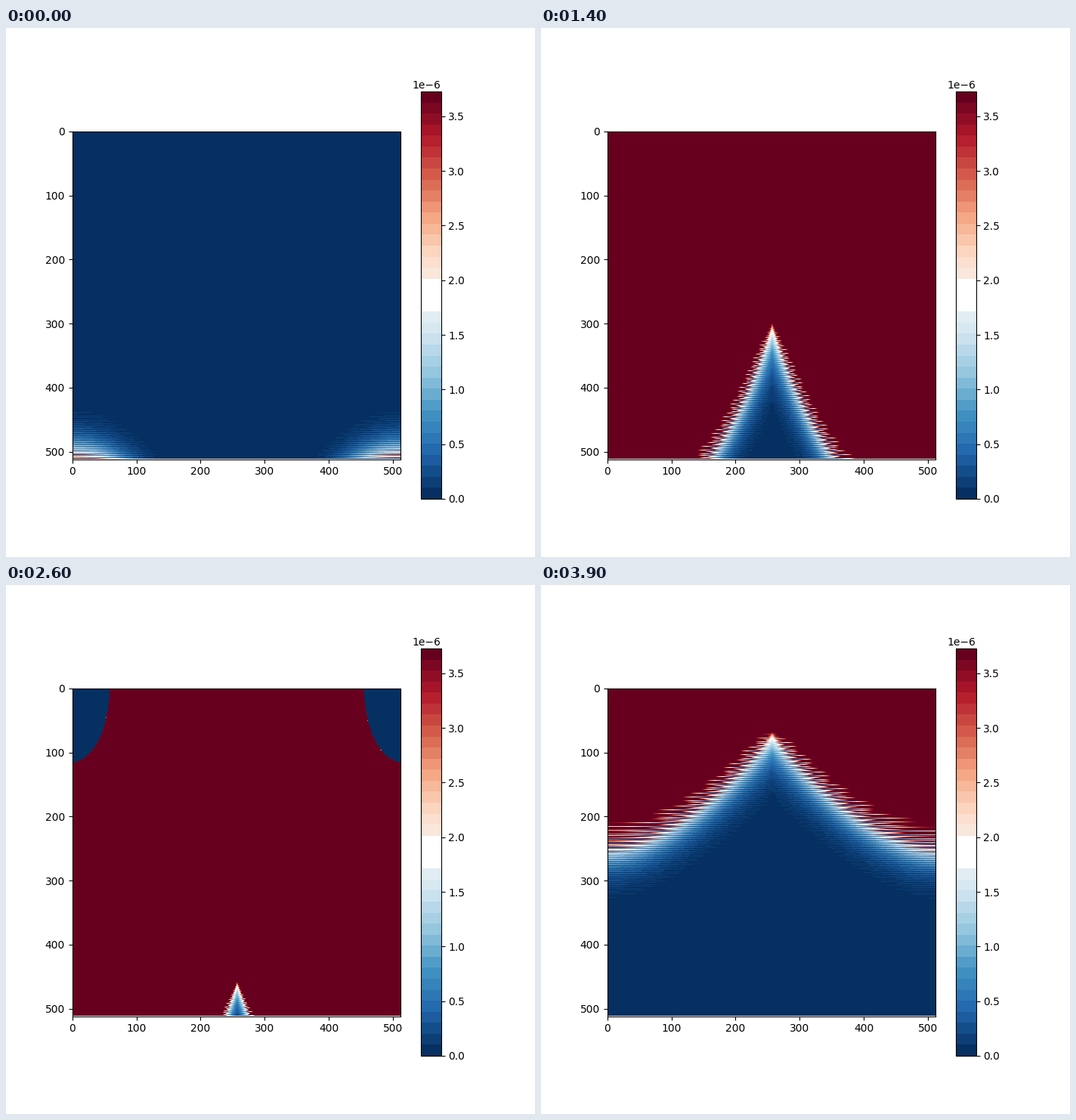
These frames come from a looping animation (700 px wide and 700 px high, 4000 ms). A matplotlib script:

```python
import numpy as np
import matplotlib.pyplot as plt
from matplotlib.animation import FuncAnimation
from matplotlib.colors import ListedColormap

N = 512
FRAMES = 40
VMAX = 3.727e-6

y, x = np.mgrid[0:N, 0:N].astype(float)
dx = x - N / 2
u = np.abs(dx) / (N / 2)
edge = np.minimum(x, N - 1 - x)

# Neighbouring rows alternate, with opposite sign on the two sides
RIPPLE = 1 + (-1) ** y * np.tanh(dx / 15)


def stepped_cmap(steps=37):
    t = np.linspace(0, 1, steps)
    colors = plt.get_cmap("RdBu_r")(t)
    colors[np.abs(t - 0.5) < 0.04] = 1
    return ListedColormap(colors)


def bell(k, centre, width):
    return np.exp(-((k - centre) / width) ** 2)


def step_of(frame):
    """After step 0 the loop runs from step 5 and ends with steps 1 to 4."""
    return (frame + 3) % (FRAMES - 1) + 1 if frame else 0


def start_level():
    return 0.65 * np.exp((y - N + 1) / 20 - (edge / 70) ** 2)


def front_level(k):
    """Growth profile around a front that sinks from the top edge."""
    apex = 20 * k - 0.15 * k ** 2
    drop = 275 * (1 - np.exp(-(k / 4.6) ** 1.5)) + 90 * bell(k, 10, 5)
    power = 2.6 - 2.4 * np.exp(-k / 4)
    ahead = y - apex - drop * (1 - (1 - u) ** power)
    tail = 22 + 23 * bell(k, 13, 8) * np.exp(-4 * u)
    scale = np.where(ahead > 0, tail, tail * (0.5 + 0.4 * u))
    return 0.5 * np.exp(np.clip(-ahead / scale, -30, 7))


def field(k):
    level = front_level(k) if k else start_level()
    z = level * RIPPLE * VMAX
    s = k - 18
    if s > 0:
        height = 10.4 * s - 0.065 * s ** 2
        z[(2 * edge / height) ** 2 + (y / height) ** 2 < 1] = 0
    return z


fig, ax = plt.subplots(figsize=(7, 7), dpi=100)
im = ax.imshow(field(0), cmap=stepped_cmap(), vmin=0, vmax=VMAX)
fig.colorbar(im)


def update(frame):
    im.set_data(field(step_of(frame)))
    return [im]


anim = FuncAnimation(fig, update, frames=FRAMES, interval=100,
                     repeat=True, repeat_delay=0)
plt.show()
```
